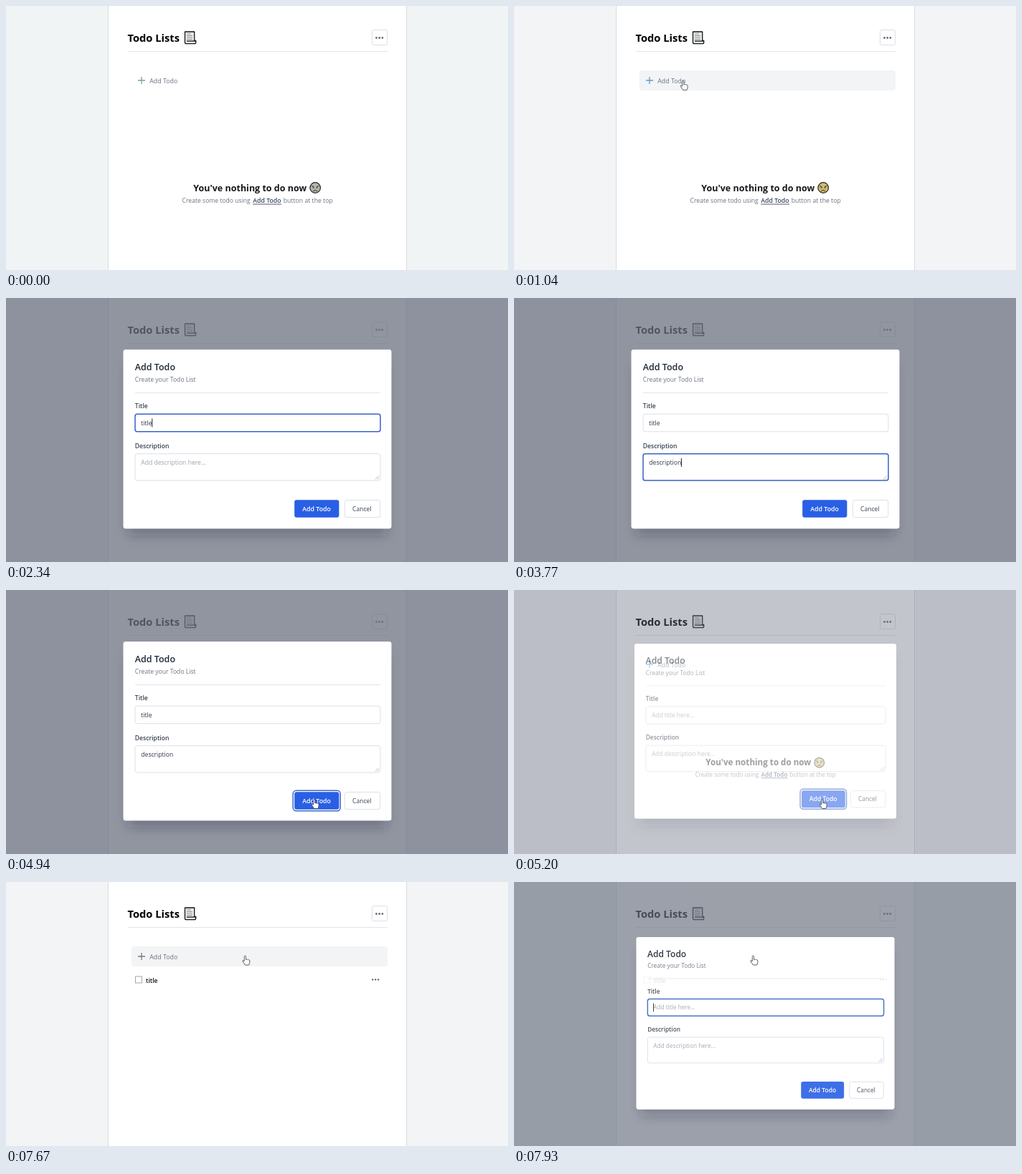
An HTML page that plays this animation: 700x369 px, repeating every 8000 ms.

```html
<!DOCTYPE html>
<html lang="en">
<head>
<meta charset="utf-8">
<title>Todo Lists</title>
<style>
  html, body { margin: 0; width: 100%; height: 100%; overflow: hidden; background: #f3f4f6; }
  svg { display: block; width: 100vw; height: 100vh; font: 8.6px "Open Sans", "Noto Sans", sans-serif; }
  text { white-space: pre; }
  .semi { font-weight: 600; }
  .bold { font-weight: 700; }
  .muted { fill: #6b7280; }
  .ink { fill: #374151; }
  .line { stroke: #e3e5e9; fill: none; }
  .field { fill: #fff; stroke: #dcdfe5; }
  .focus { stroke: #3763c6; stroke-width: 1.5; }
</style>
</head>
<body>
<svg viewBox="0 0 700 369">
  <defs>
    <filter id="blur" x="-20%" y="-20%" width="140%" height="150%"><feGaussianBlur stdDeviation="8"/></filter>
    <clipPath id="outside"><path id="hole" clip-rule="evenodd"/></clipPath>
  </defs>

  <rect id="bg" width="700" height="369"/>
  <rect x="142.5" y="-2" width="416" height="374" fill="#fff" stroke="#d9dcdf"/>

  <text x="169.5" y="50" class="bold" font-size="14.7">Todo Lists</text>
  <g stroke="#151515" stroke-width="1.3" stroke-linejoin="round">
    <path d="M249.500 36h13.200v12.500h2v2.200q0 2-2 2h-11.200q-2 0-2-2z" fill="#e9ebec"/>
    <path d="M252 49h12.500" fill="none"/>
    <path d="M252 39h6M252 41.500h8M252 44h8M252 46.500h8" stroke="#83898d" stroke-width=".9"/>
  </g>
  <rect x="510.500" y="33.500" width="21" height="21" rx="2" class="field"/>
  <g id="menu"><circle cx="516.500" cy="44.500" r="1.400"/><circle cx="520.700" cy="44.500" r="1.400"/><circle cx="524.900" cy="44.500" r="1.400"/></g>
  <path d="M170 63.500H532" class="line"/>

  <rect id="hover" x="175" y="90" width="357" height="28" rx="3" fill="#f3f4f6"/>
  <path id="plus" d="M184 104h10M189 99v10" stroke-width="1.300"/>
  <text x="200.300" y="107.700" font-size="8.800" class="muted">Add Todo</text>

  <g id="item">
    <rect x="180.500" y="132" width="9" height="9" fill="#fff" stroke="#a3a6aa"/>
    <text x="195" y="140.500" class="semi" fill="#111">title</text>
    <g fill="#555"><circle cx="511.300" cy="136.500" r="1.150"/><circle cx="515.300" cy="136.500" r="1.150"/><circle cx="519.300" cy="136.500" r="1.150"/></g>
  </g>

  <g id="empty">
    <text x="261.300" y="258.500" class="bold" font-size="12.500" fill="#16181d">You've nothing to do now</text>
    <g stroke="#222" stroke-linecap="round" fill="none">
      <circle id="face" cx="431.200" cy="254" r="7.300" stroke-width="1.200"/>
      <path d="M426.500 251.500l2.500 1M436 251.500l-2.500 1M428 254h1.500M433 254h1.500M428.500 258.500q2.700-2.600 5.400 0" stroke-width="1"/>
    </g>
    <text x="245.600" y="275.200" class="muted">Create some todo using</text>
    <text x="344.200" y="275.200" class="semi" font-size="8.750" fill="#3a4a66">Add Todo</text>
    <path d="M344.200 277H384" stroke="#3a4a66" stroke-width=".9"/>
    <text x="386.800" y="275.200" font-size="8.700" class="muted">button at the top</text>
  </g>

  <g id="veil" clip-path="url(#outside)">
    <rect width="700" height="369" fill="#6b7280" fill-opacity=".75"/>
    <rect id="shadow" x="170" y="90" width="361" height="242" rx="4" fill="#1f2937" fill-opacity=".28" filter="url(#blur)"/>
  </g>

  <g id="modal">
    <rect x="163.700" y="72.300" width="373.600" height="250" rx="3" fill="#fff"/>
    <text x="179.700" y="101.300" class="semi" font-size="12.500" fill="#1f2937">Add Todo</text>
    <text x="179.800" y="117" class="muted">Create your Todo List</text>
    <path d="M180 132.500H522" class="line"/>
    <text x="179.800" y="154" class="semi ink">Title</text>
    <rect id="titleBox" x="180" y="162.200" width="342" height="24.600" rx="3"/>
    <text id="titleText" x="188.300" y="177.700"/>
    <text x="179.800" y="209.700" class="semi ink">Description</text>
    <rect id="descBox" x="180" y="217.700" width="342" height="37.400" rx="3"/>
    <path d="M515 253.500l5-5M518 253.500l2-2" stroke="#9ca3af" stroke-width=".8"/>
    <text id="descText" x="188.300" y="233.300"/>
    <path id="caret" stroke="#222"/>
    <rect id="ring" x="400.200" y="280.200" width="66" height="28.500" rx="4.500" fill="none" stroke="#3e68c8" stroke-width="1.500"/>
    <rect x="402.200" y="282.200" width="62.200" height="24.600" rx="3" fill="#295fe5"/>
    <text x="413.300" y="297.700" class="semi" fill="#fff" font-size="8.800">Add Todo</text>
    <rect x="472.300" y="282.500" width="49.500" height="24" rx="3" class="field"/>
    <text x="483" y="297.700" font-weight="500" class="ink">Cancel</text>
  </g>

  <g id="cursor" fill="#fff" stroke="#4b4f57" stroke-width=".9" stroke-linejoin="round">
    <path id="hand" d="M-1 1q0-1.500 1.100-1.500T1.200 1v4q.8-.8 2 0q1-.5 2 .3q1.300-.2 1.300 1.200v2.700l-1.100 3.300h-5.300l-3.300-5q-.6-1.600.7-1.500l1.500 1.300z"/>
    <path id="arrow" d="M0 0v10.500l2.500-2.300 1.700 3.800 1.700-.8-1.700-3.700h3.300z"/>
  </g>
</svg>

<script>
const LOOP = 8000, STEP = 130;
const CX = 350.5, CY = 197.3;
const $ = id => document.getElementById(id);
const clamp = (v, lo = 0, hi = 1) => Math.min(hi, Math.max(lo, v));
const part = (t, from, to) => clamp((t - from) / (to - from));
const ease = p => p * p * (3 - 2 * p);
const set = (id, attrs) => { for (const k in attrs) $(id).setAttribute(k, attrs[k]); };
const scaleAt = (s, x, y, dy = 0) => `translate(${x} ${y + dy}) scale(${s}) translate(${-x} ${-y})`;

// Cursor legs: start, end, from, to
const legs = [
  [390, 910, [420, 369], [235.6, 105]],
  [4160, 4810, [235.6, 105], [429.6, 293]],
  [5720, 6370, [429.6, 293], [521.5, 53]],
  [6890, 7670, [521.5, 53], [333.3, 103.5]]
];

function cursorAt(t) {
  const leg = legs.filter(l => t >= l[0]).pop();
  if (!leg || (t >= 1560 && t < 4160)) return null;
  const [start, end, a, b] = leg, p = ease(part(t, start, end));
  return a.map((v, i) => v + (b[i] - v) * p);
}

function modalState(t) {
  const second = t >= 7790;
  if (t < 1095 || (t >= 5320 && !second)) return { open: 0, scale: 1 };
  if (t >= 5100 && !second) {
    const p = part(t, 5100, 5320);
    return { open: 1 - p, scale: 1 - 0.05 * p };
  }
  const age = t - (second ? 7790 : 1095);
  return { open: 1 - (1 - part(age, 0, 205)) ** 2, scale: 0.95 + 0.05 * part(age, 102, 250) };
}

function holePath(s) {
  const w = 373.6 * s, h = 250 * s, r = 3 * s;
  const x = CX - w / 2, y = CY - h / 2;
  return `M0 0H700V369H0ZM${x + r} ${y}h${w - 2 * r}q${r} 0 ${r} ${r}v${h - 2 * r}q0 ${r} ${-r} ${r}` +
    `h${2 * r - w}q${-r} 0 ${-r} ${-r}v${2 * r - h}q0 ${-r} ${r} ${-r}z`;
}

function fillField(id, value, hint) {
  $(id).textContent = value || hint;
  $(id).setAttribute("fill", value ? "#30384a" : "#9ca3af");
}

function drawModal(t) {
  const { open, scale } = modalState(t);
  const shown = open > 0 ? "inline" : "none";
  set("veil", { display: shown, opacity: open });
  set("modal", { display: shown, opacity: open, transform: scaleAt(scale, CX, CY) });
  set("shadow", { transform: scaleAt(scale, CX, CY) });
  set("hole", { d: holePath(scale) });

  const filled = t < 5100;
  const title = filled ? "title".slice(0, clamp(Math.floor((t - 1560) / STEP) + 1, 0, 5)) : "";
  const desc = filled ? "description".slice(0, Math.ceil(11 * part(t, 2860, 3770))) : "";
  fillField("titleText", title, "Add title here...");
  fillField("descText", desc, "Add description here...");

  const inTitle = t < 2730 || t >= 7790, inDesc = t >= 2730 && t < 4940;
  $("titleBox").setAttribute("class", inTitle ? "field focus" : "field");
  $("descBox").setAttribute("class", inDesc ? "field focus" : "field");
  const value = inTitle ? title : desc;
  const width = value && open ? $(inTitle ? "titleText" : "descText").getComputedTextLength() : 0;
  set("caret", {
    display: inTitle || inDesc ? "inline" : "none",
    d: `M${188.5 + width} ${inTitle ? 168.5 : 224}v12`
  });
  set("ring", { display: t >= 4940 && t < 5400 ? "inline" : "none" });
}

function draw(now) {
  const t = Math.floor((now % LOOP) / STEP) * STEP;
  const early = t < 390, done = t >= 5330;
  const pos = cursorAt(t);
  const over = (x0, y0, x1, y1) => pos && pos[0] > x0 && pos[0] < x1 && pos[1] > y0 && pos[1] < y1;
  const free = t < 1300 || (t >= 5330 && t < 7930);
  const onAdd = free && over(175, 90, 532, 118);
  const onMenu = free && over(510, 33, 532, 56);
  const onSubmit = !free && over(402, 282, 465, 307);

  set("bg", { fill: early ? "#f1f4f4" : "#f3f4f6" });
  set("face", { fill: early ? "#b4b8ae" : "#cfbd72" });
  set("plus", { stroke: early ? "#7b9ea7" : done ? "#777b80" : "#609ac0" });
  set("menu", { fill: onMenu ? "#151515" : "#6d7075" });
  set("hover", { display: onAdd ? "inline" : "none" });

  const exit = part(t, 5100, 5330);
  set("empty", {
    display: exit < 1 ? "inline" : "none",
    opacity: 1 - exit ** 3,
    transform: scaleAt(1 - 0.155 * exit, 350.5, 262, -30.5 * exit)
  });
  set("item", { display: done ? "inline" : "none", opacity: part(t, 5140, 5460) });
  drawModal(t);

  set("cursor", { display: pos ? "inline" : "none" });
  if (pos) {
    const hand = onAdd || onMenu || onSubmit || (t >= 1170 && t < 1560) || t >= 7670;
    set("cursor", { transform: `translate(${pos})` });
    set("hand", { display: hand ? "inline" : "none" });
    set("arrow", { display: hand ? "none" : "inline" });
  }
}

const begin = performance.now();
function tick() {
  draw(performance.now() - begin);
  requestAnimationFrame(tick);
}
tick();
</script>
</body>
</html>
```
